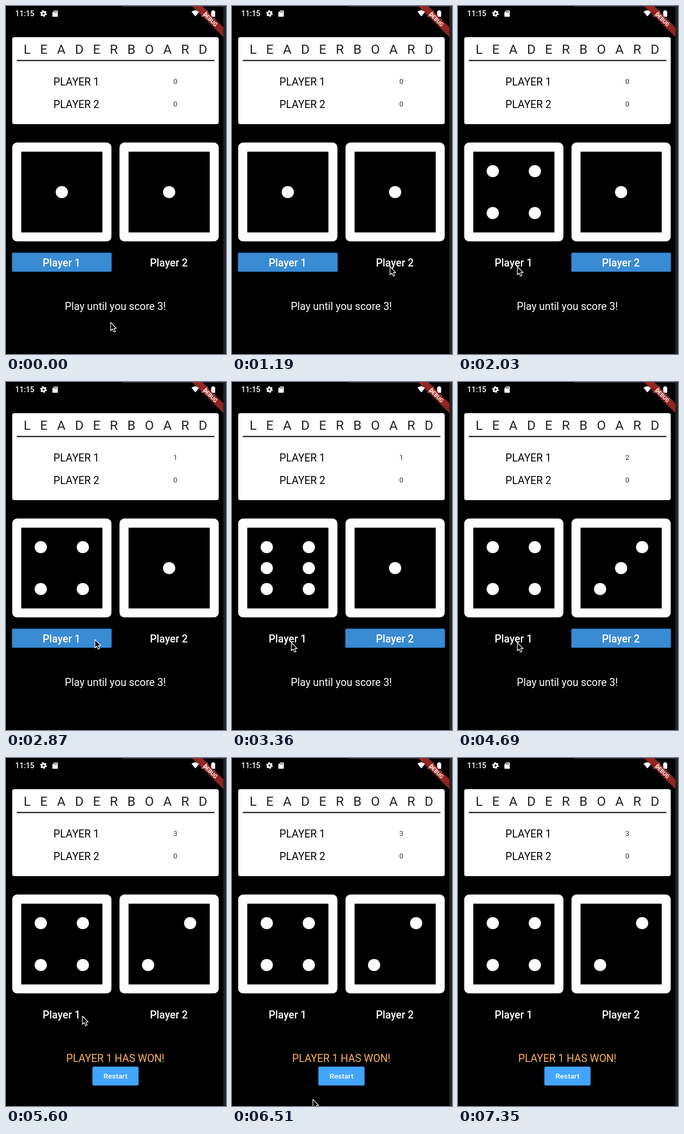
Recreate the animation shown at these times as an HTML page. Size 408 by 648 pixels, loop 7.49 s.

```html
<!DOCTYPE html>
<html lang="en">
<head>
<meta charset="utf-8">
<title>Dice leaderboard</title>
<style>
  html, body { margin: 0; width: 100%; height: 100%; overflow: hidden; background: #000; }
  svg { display: block; width: 408px; height: 648px; font-family: Roboto, sans-serif; }
  .body { font-size: 19.4px; }
  .medium { font-weight: 500; }
  .small { font-size: 13.7px; }
  .mid { text-anchor: middle; }
  .raised { stroke: #1b4580; stroke-width: 1.6; paint-order: stroke; }
</style>
</head>
<body>
<svg viewBox="0 0 408 648">
  <rect width="408" height="648"/>
  <rect x="403" width="5" height="648" fill="#242424"/>
  <rect x="215" width="193" height="1.5" fill="#303030"/>

  <g fill="#fff">
    <text x="17" y="19" font-size="14" class="medium">11:15</text>
    <g transform="translate(69.5 14)" fill="none" stroke="#fff">
      <circle r="3.4" stroke-width="2.8"/>
      <circle r="5.2" stroke-width="2" stroke-dasharray="2.72 2.72"/>
    </g>
    <path d="M89.500 8.500H95a1 1 0 0 1 1 1V19a1 1 0 0 1-1 1H87a1 1 0 0 1-1-1V12Z"/>
    <path d="M89.700 10v2.300m2-2.300v2.300m2-2.300v2.300" stroke="#000"/>
    <path d="M344 10.500Q351 5.500 358.500 10.500L351.200 19.500Z"/>
    <path d="M373.500 8V19.500H362Z"/>
    <path d="M380.500 9.500H382.500V8H386V9.500H388V20H380.500Z"/>
  </g>
  <clipPath id="screen"><rect width="403" height="648"/></clipPath>
  <g clip-path="url(#screen)">
    <g transform="translate(402.5 0) rotate(45)">
      <rect x="-45" y="27.5" width="90" height="13" fill="#b9302b" fill-opacity=".78"/>
      <text x="1" y="37.8" class="mid" font-size="10.2" font-weight="700" fill="#fff">DEBUG</text>
    </g>
  </g>

  <rect x="11.5" y="58" width="383" height="162" rx="4" fill="#fff"/>
  <text x="32.8" y="89" font-size="24.3" letter-spacing="17.45" fill="#222">LEADERBOARD</text>
  <path d="M20 101.500H386.500" stroke="#000" stroke-width="1.8"/>
  <g class="body mid">
    <text x="130.5" y="147.5">PLAYER 1</text>
    <text x="130.5" y="189.5">PLAYER 2</text>
  </g>
  <g class="small mid" fill="#333">
    <text id="score" x="314" y="145.3"/>
    <text x="314" y="187">0</text>
  </g>

  <g id="players"/>

  <text id="message" x="202.8" y="565.6" class="body mid"/>
  <g id="restart">
    <rect x="160.5" y="575" width="85" height="34.5" rx="2" fill="#42a5fb" class="raised"/>
    <text x="203" y="597.3" class="small medium mid" fill="#fff">Restart</text>
  </g>

  <path id="cursor" d="M0 0V15.500L3.400 12.300L6 18L8.700 16.900L6.200 11.300H10.800Z"
        fill="#000" stroke="#fff" stroke-width="1.2" stroke-linejoin="round"/>
</svg>
<script>
const LOOP = 7490, STEP = 70, GLIDE = 440;
const LEFT = 110, RIGHT = 284, BUTTON_Y = 485;
const byId = id => document.getElementById(id);

// Pointer visits; those with a roll are clicks, taken by the players in turn.
const visits = [
  { at: 0, x: 194, y: 589 },
  { at: 630, x: LEFT },
  { at: 1190, x: RIGHT + 9 },
  { at: 1960, x: LEFT, roll: 4 },
  { at: 2520, x: RIGHT + 9, roll: 1 },
  { at: 3360, x: LEFT, roll: 6 },
  { at: 4060, x: RIGHT - 9, roll: 3 },
  { at: 4620, x: LEFT, roll: 4 },
  { at: 5210, x: RIGHT, roll: 2 },
  { at: 5650, x: LEFT },
  { at: 6370, x: 150, y: 637 },
  { at: LOOP, x: 150, y: 660 }
];
const clicks = visits.filter(visit => visit.roll);

function playUntil(time) {
  const game = { dice: [1, 1], turn: 0, score: 0 };
  for (const { roll } of clicks.filter(click => click.at <= time)) {
    game.dice[game.turn] = roll;
    if (game.turn === 1 && game.dice[0] > roll) game.score++;
    game.turn = 1 - game.turn;
  }
  return game;
}

function hasPip(value, col, row) {
  if (!col) return !row && value % 2 === 1;
  if (!row) return value === 6;
  return value > (col === row ? 3 : 1);
}

const sides = [-1, 0, 1];
const drawPips = value => sides.flatMap(row => sides
  .filter(col => hasPip(value, col, row))
  .map(col => `<circle cx="${103.5 + 39 * col}" cy="${346.5 + 39 * row}" r="11.3"/>`)).join('');

byId('players').innerHTML = [0, 1].map(i => `
  <g transform="translate(${i * 199} 0)" fill="#fff">
    <rect x="11.5" y="254.3" width="184" height="184" rx="9"/>
    <rect x="28.3" y="271.3" width="150.5" height="150.3" fill="#000"/>
    <g id="pips${i}"></g>
    <rect id="button${i}" class="raised" x="11.5" y="459.8" width="184" height="34.7" rx="2" fill="#398bd3"/>
    <text x="103" y="484.8" class="body medium mid">Player ${i + 1}</text>
  </g>`).join('');

const show = (id, visible) => byId(id).setAttribute('visibility', visible ? 'visible' : 'hidden');

function drawGame({ dice, turn, score }) {
  const won = score === 3;
  dice.forEach((value, i) => {
    byId('pips' + i).innerHTML = drawPips(value);
    show('button' + i, turn === i && !won);
  });
  byId('score').textContent = score;
  byId('message').textContent = won ? 'PLAYER 1 HAS WON!' : 'Play until you score 3!';
  byId('message').setAttribute('fill', won ? '#fbb356' : '#fff');
  show('restart', won);
}

function moveCursor(time) {
  const leaving = visit => visit.at + STEP;
  const last = Math.max(0, visits.filter(visit => leaving(visit) <= time).length - 1);
  const from = visits[last], to = visits[last + 1];
  const p = Math.min(1, Math.max(0, (time - leaving(from)) / GLIDE));
  const ease = p * p * (3 - 2 * p);
  const mix = (a, b) => a + (b - a) * ease;
  // The hand lifts slightly midway between two rests.
  const y = mix(from.y ?? BUTTON_Y, to.y ?? BUTTON_Y) - 6 * Math.sin(Math.PI * p);
  byId('cursor').setAttribute('transform', `translate(${mix(from.x, to.x)} ${y})`);
}

const start = performance.now();
let drawn;
function render(now) {
  const elapsed = Math.max(0, now - start) % LOOP;
  const time = Math.floor(elapsed / STEP) * STEP;
  if (time !== drawn) {
    drawGame(playUntil(time));
    moveCursor(time);
    drawn = time;
  }
  requestAnimationFrame(render);
}
render(start);
</script>
</body>
</html>
```
